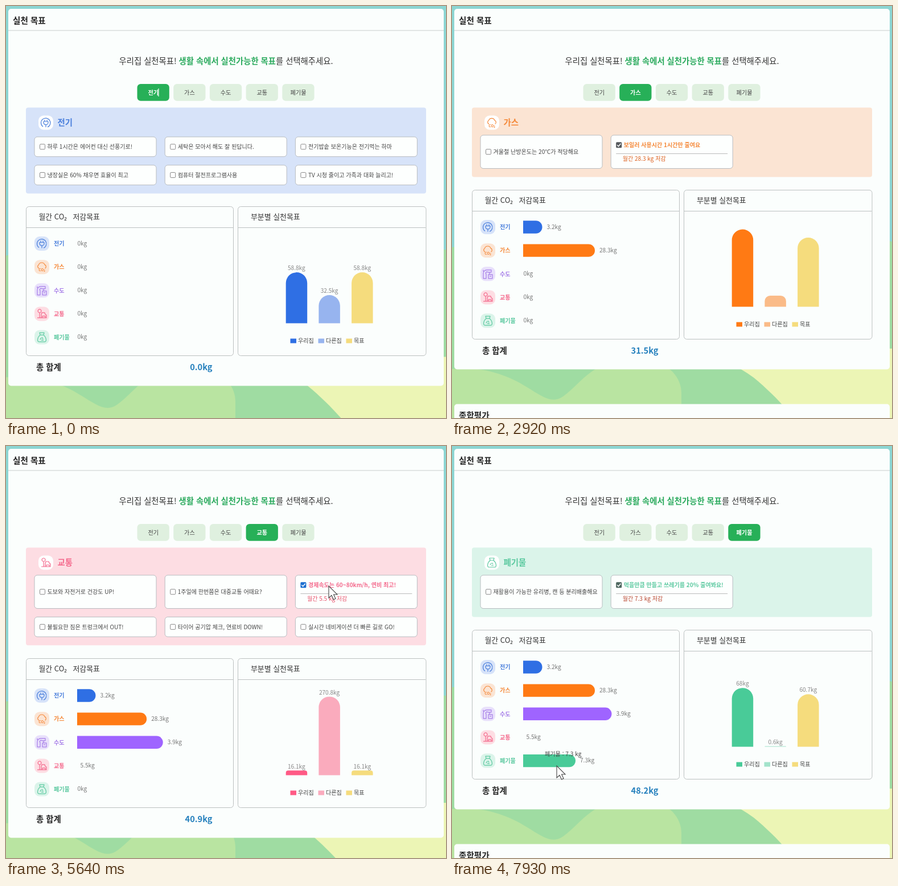
These frames come from a looping animation (773 px wide and 724 px high, 8 s). An HTML page:

```html
<!DOCTYPE html>
<html lang="ko">
<head>
<meta charset="utf-8">
<style>
html, body { margin: 0; width: 100%; height: 100%; overflow: hidden; background: #8cd6d3; }
svg { display: block; width: 773px; height: 724px; }
text { font-family: "Noto Sans CJK KR", "Noto Sans KR", "Noto Sans CJK", "Noto Sans CJK JP", "Noto Sans", sans-serif; white-space: pre; }
</style>
</head>
<body>
<svg id="stage" viewBox="0 0 773 724"></svg>
<script>
const LOOP = 8000;
const stage = document.getElementById('stage');

// open / check: when the tab is chosen and when its goal is ticked
const tabs = [
  { name: '전기', open: -5000, check: 910, pick: 0, cut: 3.2, bar: 33.5, own: 58.8, other: 32.5, scale: 1.52, rowTop: 230,
    color: '#2f6fe4', soft: '#97b4ef', pale: '#d7e3f9', title: '#4a7fdc', box: '#1d6fd0', note: '#3a68c0',
    items: ['하루 1시간은 에어컨 대신 선풍기로!', '세탁은 모아서 해도 잘 된답니다.', '전기밥솥 보온기능은 전기먹는 하마',
      '냉장실은 60% 채우면 효율이 최고', '컴퓨터 절전프로그램사용', 'TV 시청 줄이고 가족과 대화 늘리고!'],
    icon: 'M-5 7A8.2 8.2 0 1 1 3 7.8M0 8V3M-4-2H4V0A4 3.5 0 0 1-4 0ZM-2-2V-5M2-2V-5' },
  { name: '가스', open: 1600, check: 2520, pick: 1, cut: 28.3, bar: 126, own: 265.6, other: 38.1, scale: .512, rowTop: 227,
    color: '#ff7a14', soft: '#fabb88', pale: '#fbe4d3', title: '#f58838', box: '#55595d', note: '#dd601e',
    items: ['겨울철 난방온도는 20℃가 적당해요', '보일러 사용시간 1시간만 줄여요'],
    icon: 'M-5 2.5A3.6 3.6 0 0 1-5.5-4A5.6 5.6 0 0 1 5-4A3.6 3.6 0 0 1 5.5 2.5' },
  { name: '수도', open: 3250, check: 3900, pick: 0, cut: 3.9, bar: 155.5, own: 29.2, other: 1.6, scale: 1.52, rowTop: 227,
    color: '#9f64ff', soft: '#cdb0f5', pale: '#e8e0fb', title: '#a67de8', box: '#1d6fd0', note: '#cc4a35',
    items: ['절수기로 물낭비를 쉽게 막아요.', '물을 받아서 사용해요.(설거지, 양치할때)', '짧게 샤워하는 그대가 진정한 멋쟁이!'],
    icon: 'M-8 8V-1A6 6 0 0 1-2-7H6V-3H0A2 2 0 0 0-3 0V8ZM1 8V1H8V8ZM-8-7V-4M3-3V1M3 4H6' },
  { name: '교통', open: 4950, check: 5580, pick: 2, cut: 5.5, bar: 0, own: 16.1, other: 270.8, scale: .51, rowTop: 227,
    color: '#ff5a85', soft: '#faabbd', pale: '#fddde3', title: '#f4698c', box: '#1d6fd0', note: '#e8536c',
    items: ['도보와 자전거로 건강도 UP!', '1주일에 한번쯤은 대중교통 어때요?', '경제속도는 60~80km/h, 연비 최고!',
      '불필요한 짐은 트렁크에서 OUT!', '타이어 공기압 체크, 연료비 DOWN!', '실시간 네비게이션 더 빠른 길로 GO!'],
    icon: 'M-4-2A3 3 0 1 1-3.9-2V7M-8 7H8V2L6 1 5-2H0L-1 1V7M1 7V4H6V7' },
  { name: '폐기물', open: 5990, check: 7000, pick: 1, cut: 7.3, bar: 92, own: 68, other: .6, scale: 1.52, rowTop: 227,
    color: '#49cb98', soft: '#a3e3cb', pale: '#dbf4ea', title: '#5cc9a0', box: '#4f6860', note: '#b8452e',
    items: ['재활용이 가능한 유리병, 캔 등 분리배출해요', '먹을만큼 만들고 쓰레기를 20% 줄여봐요!'],
    icon: 'M-3-4C-8 0-9 8-5 8H5C9 8 8 0 3-4ZM-3-4L-4-8H4L3-4M0 0L2 3M3 5H-1M-3 4L-1 1' }
];

const GOAL = '#f5dc7d';
const pointerPath = [[80, 268, 152], [720, 64, 247], [1250, 64, 247], [1560, 313, 152], [1780, 313, 152],
  [2360, 293, 244], [2960, 293, 244], [3200, 376, 152], [3400, 376, 152], [3690, 64, 244], [4250, 64, 244],
  [4660, 440, 152], [4950, 440, 152], [5420, 567, 246], [5710, 567, 246], [5950, 527, 152], [6230, 527, 152],
  [6390, 494, 195], [6480, 494, 195], [6850, 293, 244], [7240, 293, 244], [7860, 184, 562], [LOOP, 184, 562]];
const pointerHidden = [[0, 80], [1560, 1780], [2440, 2980], [3200, 3400], [5950, 6250]];
const carets = [[0, 80, 268], [1560, 1780, 313], [3200, 3400, 376], [5950, 6480, 527]];

const clamp = v => Math.max(0, Math.min(1, v));
const easeOut = v => 1 - (1 - clamp(v)) ** 3;
const within = (t, [from, to]) => t >= from && t < to;
const kg = v => +v.toFixed(1) + 'kg';

const rect = (x, y, w, h, r, fill, stroke = 'none') =>
  `<rect x="${x}" y="${y}" width="${w}" height="${h}" rx="${r}" fill="${fill}" stroke="${stroke}"/>`;
const line = (x1, x2, y, color) => `<path d="M${x1} ${y}H${x2}" stroke="${color}"/>`;
// y is the optical middle of the line of text
const text = (x, y, s, size, fill, weight = 400, anchor = 'start') =>
  `<text x="${x}" y="${y + size * .37}" font-size="${size}" fill="${fill}" font-weight="${weight}" text-anchor="${anchor}">${s}</text>`;

function icon(tab, x, y, bg) {
  const label = tab.name === '가스' ? text(0, 5.3, 'CO₂', 6.5, tab.title, 700, 'middle') : '';
  return rect(x - 13, y - 12.5, 26, 25, 9, bg) +
    `<g transform="translate(${x} ${y})"><path d="${tab.icon}" fill="none" stroke="${tab.title}" stroke-width="1.2" stroke-linejoin="round"/>${label}</g>`;
}

function background(shift) {
  return `<rect width="773" height="724" fill="#8cd6d3"/><g transform="translate(0 ${shift})">
    <path d="M0 412C200 380 600 370 773 402V800H0Z" fill="#9fdca2"/>
    <path d="M0 626C48 619 98 636 132 658C158 674 174 686 192 676C212 664 226 642 255 624C288 606 330 601 362 614C388 625 403 645 403 668V800H0Z" fill="#b9e4a1"/>
    <path d="M430 592C470 605 502 621 530 641C552 659 572 679 588 697L640 800H773V590Z" fill="#ecf5b5"/></g>`;
}

function checkbox(x, y, on, color) {
  return on
    ? rect(x, y - 5, 10, 10, 1.5, color) + `<path d="M${x + 2} ${y}l2.3 2.5 4-5" fill="none" stroke="#fff" stroke-width="1.5"/>`
    : rect(x + .5, y - 4.5, 9, 9, 1.5, '#fff', '#888');
}

function goalPanel(tab, checked) {
  let y = tab.rowTop, cards = '';
  for (let first = 0; first < tab.items.length; first += 3) {
    const tall = checked && tab.pick >= first && tab.pick < first + 3;
    const h = tall ? 58.5 : 34.7;
    tab.items.slice(first, first + 3).forEach((label, col) => {
      const x = 50 + col * 229.2, on = checked && first + col === tab.pick;
      const mid = on ? y + 17.2 : y + h / 2;
      cards += rect(x, y, 214, h, 5, '#fdfffe', '#b8bcc0') + checkbox(x + 9, mid, on, tab.box) +
        text(x + 22.5, mid, label, 10.05, on ? tab.title : '#444', on ? 700 : 400);
      if (on) cards += line(x + 9, x + 205, y + 32.5, '#bbb') +
        text(x + 20.5, y + 41, `월간 ${tab.cut} kg 저감`, 10.05, tab.note, 500);
    });
    y += h + 15;
  }
  const svg = rect(35, 178.5, 703, y - 178.5, 4, tab.pale) + icon(tab, 70, 205, '#fff') +
    text(90.5, 205, tab.name, 14.4, tab.title, 700) + cards;
  return { svg, bottom: y };
}

function monthlyChart(t, top, tab) {
  const since = t - tab.open;
  return tabs.map((row, i) => {
    const y = top + 65.5 + i * 41.15;
    let svg = icon(row, 63, y, row.pale) + text(84, y, row.name, 10.1, row.title, 700);
    if (since < 430) return svg;
    const done = t >= row.check;
    const w = done ? row.bar * easeOut((t - Math.max(row.check, tab.open + 430)) / 380) : 0;
    if (w > .5) {
      const r = Math.min(11.2, w / 2);
      svg += `<path d="M125 ${y - 11.2}H${125 + w - r}a${r} 11.2 0 0 1 0 22.4H125Z" fill="${row.color}"/>`;
    }
    const x = !done ? 125.5 : row.bar ? 133 + w : 130.5;
    return svg + text(x, y - .5, done ? kg(row.cut) : '0kg', 10.1, '#777');
  }).join('');
}

function column(x, base, h, fill) {
  const r = Math.min(18.7, h / 2);
  return `<path d="M${x} ${base}v${r - h}a${r} ${r} 0 0 1 ${r} ${-r}h${37.5 - 2 * r}a${r} ${r} 0 0 1 ${r} ${r}v${h - r}Z" fill="${fill}"/>`;
}

function sectorChart(t, top, tab) {
  const since = t - tab.open, ticked = t - tab.check;
  if (since < 180) return '';
  const grow = easeOut((since - 180) / 260);
  const goal = tab.own - tab.cut * easeOut((ticked - 100) / 280);
  const values = [tab.own, tab.other, goal], fills = [tab.color, tab.soft, GOAL];
  return ['우리집', '다른집', '목표'].map((name, i) => {
    const x = 491.7 + i * 57.7, base = top + 205.5, h = Math.max(1, values[i] * tab.scale * grow);
    const labelled = since > 370 + i * 60 && !(ticked > 100 && ticked < 490);
    const key = 499.5 + i * 49;
    return column(x, base, h, fills[i]) +
      (labelled ? text(x + 18.7, base - h - 7.5, kg(values[i]), 10.1, '#888', 400, 'middle') : '') +
      rect(key, top + 232.5, 10.5, 8, 0, fills[i]) + text(key + 13.5, top + 236, name, 10.1, '#444');
  }).join('');
}

function chartBox(x, w, top) {
  return rect(x + .5, top + .5, w, 262, 5, 'none', '#bcc0c0') + line(x, x + w, top + 37.5, '#bcc0c0');
}

function sheet(y, h, title) {
  return rect(4, y, 765, h, 5, '#fbfefd') + text(12, y + 20.5, title, 14.6, '#222', 700) + line(4, 769, y + 38, '#c8cccc');
}

function tabBar(active) {
  return tabs.map((tab, i) => {
    const x = 230.5 + i * 63.7, on = i === active;
    return rect(x, 137, 56.3, 29.8, 6, on ? '#27b058' : '#dff0df') +
      text(x + 28.2, 152, tab.name, 10.15, on ? '#fff' : '#444', on ? 700 : 400, 'middle');
  }).join('');
}

function pointer(t) {
  let svg = carets.filter(c => within(t, c)).map(c => `<path d="M${c[2]} 145v14" stroke="#fff" stroke-width="1.2"/>`).join('');
  if (pointerHidden.some(span => within(t, span))) return svg;
  const i = Math.max(1, pointerPath.findIndex(p => p[0] > t));
  const [a, b] = [pointerPath[i - 1], pointerPath[i]];
  const u = clamp((t - a[0]) / (b[0] - a[0])), s = u * u * (3 - 2 * u);
  const x = a[1] + (b[1] - a[1]) * s, y = a[2] + (b[2] - a[2]) * s;
  return svg + `<path transform="translate(${x} ${y})" d="M0 0V21L5 16.5 8.5 24 12 22.3 8.6 15H15Z" fill="#fff" stroke="#444" stroke-width="1.1"/>`;
}

function render(t) {
  const active = tabs.findLastIndex(tab => t >= tab.open), tab = tabs[active];
  const panel = goalPanel(tab, t >= tab.check);
  const top = Math.round(panel.bottom + 22.6), bottom = top + 315.5;
  const total = tabs.reduce((sum, row) => sum + (t >= row.check ? row.cut : 0), 0);

  stage.innerHTML = background((bottom - 614.5) / 2) +
    sheet(5, bottom - 5, '실천 목표') + sheet(bottom + 61, 200, '종합평가') +
    text(386.5, 96.5, '우리집 실천목표! <tspan fill="#2dab5f" font-weight="700">생활 속에서 실천가능한 목표</tspan>를 선택해주세요.', 14.35, '#333', 400, 'middle') +
    tabBar(active) + panel.svg +
    chartBox(35, 364, top) + chartBox(407, 330.5, top) +
    text(57.5, top + 18.5, '월간 CO₂', 12.9, '#333') + text(117.5, top + 18.5, '저감목표', 12.9, '#333') +
    text(430, top + 18.5, '부분별 실천목표', 12.9, '#333') +
    monthlyChart(t, top, tab) + sectorChart(t, top, tab) +
    text(53, top + 282.5, '총 합계', 14.4, '#222', 700) +
    text(362.5, top + 282.5, total.toFixed(1) + 'kg', 14.6, '#2580bd', 700, 'end') +
    (t >= 7780 ? text(163, top + 218, '폐기물 : 7.3 kg', 10.1, '#444') : '') +
    pointer(t);
}

const start = performance.now();
function tick() {
  render((performance.now() - start) % LOOP);
  requestAnimationFrame(tick);
}
tick();
</script>
</body>
</html>
```
